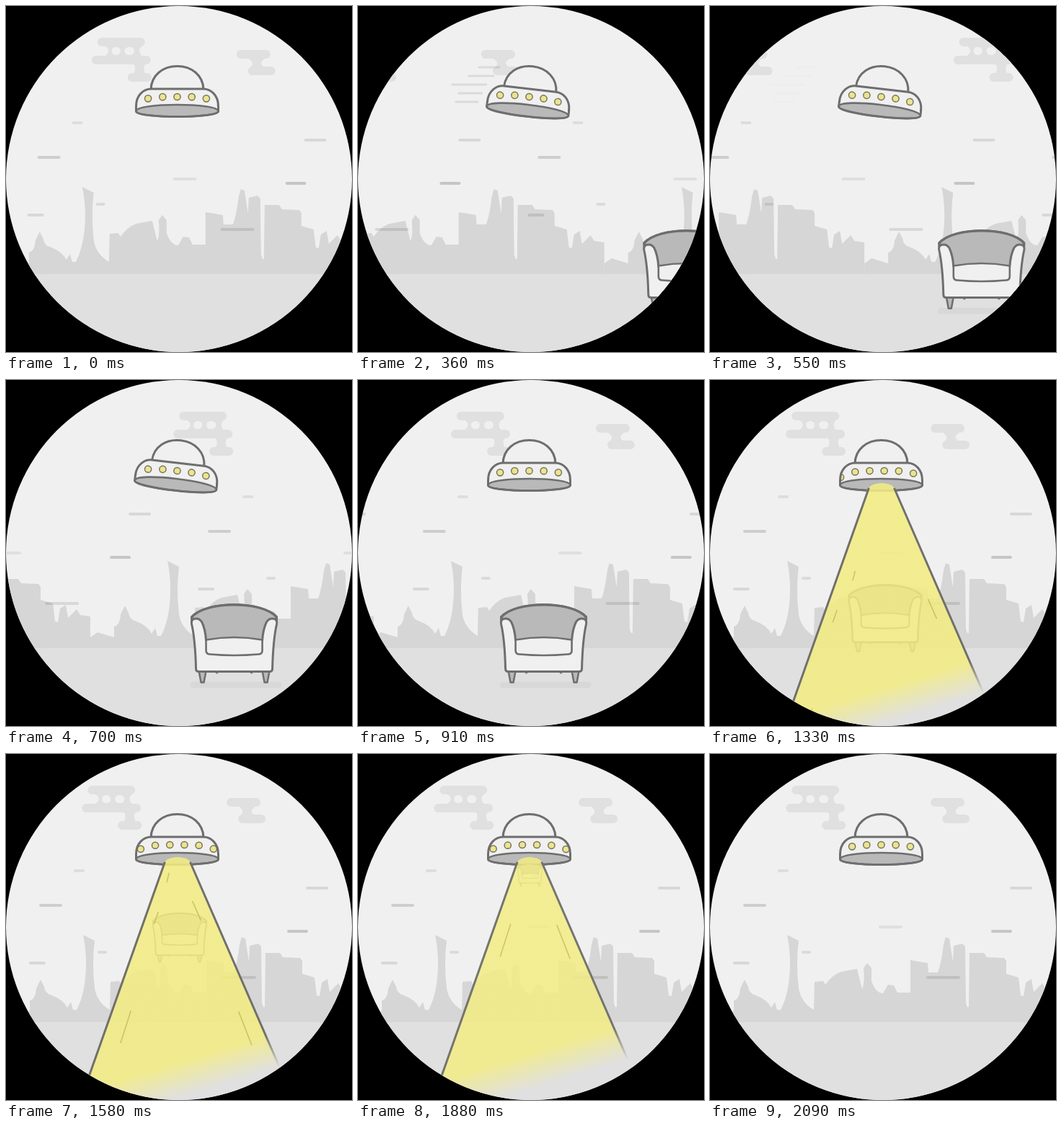
These frames come from a looping animation (480x480 px, 2.12 s). An HTML page with a canvas:

```html
<!DOCTYPE html>
<html lang="en">
<head>
<meta charset="utf-8">
<title>Flying saucer and armchair</title>
<style>
html, body { margin: 0; width: 100%; height: 100%; overflow: hidden; background: #000; }
canvas { display: block; }
</style>
</head>
<body>
<canvas id="stage" width="480" height="480"></canvas>
<script>
const c = document.getElementById('stage').getContext('2d');
const LOOP = 2120, LINE = '#6e6e6e', LIGHT = '#f0f0f0', GREY = '#b9b9b9';

const clamp = v => Math.min(1, Math.max(0, v));
const span = (t, a, b) => clamp((t - a) / (b - a));
const sine = p => (1 - Math.cos(Math.PI * p)) / 2;
const easeOut = p => 1 - (1 - p) ** 3;

// Skyline outline, one 480 px period.
const skyline = new Path2D('M0 373V357L10 350L33 357V342Q41 340 42 325L48 313L53 323Q54 332 62 334' +
  'Q80 341 85 352L90 344L93 355L98 355Q111 330 111 290Q111 270 107 251L123 259Q119 290 123 325' +
  'Q126 344 144 355L145 316L157 315L160 320Q170 306 182 302L204 298L211 326Q215 318 213 297' +
  'L218 290L224 297V315Q230 332 240 332L247 320L255 321L260 331H278V286L302 290L303 303H316' +
  'Q321 290 324 264L327 254L332 256L337 288L338 266L350 263L354 267L355 345L357 351H359L360 276' +
  'H380L384 282L408 283L411 287V305L428 310L431 335L435 336L438 317L446 312L449 330L461 318L466 326L480 328V373Z');

// x, y, length, opacity
const dashes = [[96, 162, 11, .08], [418, 186, 27, .1], [48, 210, 28, .14], [236, 240, 29, .07],
  [392, 246, 25, .18], [34, 290, 19, .1], [129, 275, 9, .09], [302, 310, 43, .1]];
const wake = [[168, 85, 28], [154, 97, 34], [131, 109, 47], [140, 121, 32], [136, 133, 30]];

function dash(x, y, len, alpha, width = 4) {
  c.strokeStyle = `rgba(0,0,0,${alpha})`;
  c.lineWidth = width;
  c.beginPath(); c.moveTo(x, y); c.lineTo(x + len, y); c.stroke();
}

function shape(d, fill, width = 3) {
  const path = new Path2D(d);
  if (fill) { c.fillStyle = fill; c.fill(path); }
  if (width) { c.strokeStyle = LINE; c.lineWidth = width; c.stroke(path); }
}

function pill(x, y, w, h = 12) {
  c.beginPath(); c.roundRect(x, y, w, h, h / 2); c.fill();
}

function at(x, y, draw) {
  c.save(); c.translate(x, y); draw(); c.restore();
}

function clouds() {
  c.fillStyle = '#e0e0e0';
  pill(0, 44, 66); pill(-8, 69, 82); pill(42, 93, 33);
  shape('M10 55H62Q55 62 62 70H10Q21 62 10 55ZM50 80H67Q62 87 67 94H50Q55 87 50 80Z', '#e0e0e0', 0);
  c.fillStyle = LIGHT;
  pill(20, 57, 12, 11); pill(38, 57, 13, 11);
  c.fillStyle = '#e0e0e0';
  pill(193, 61, 47); pill(209, 84, 38);
  shape('M208 72H234Q222 79 232 85H212Q220 79 208 72Z', '#e0e0e0', 0);
}

function scenery(t, shift) {
  c.fillStyle = LIGHT; c.fillRect(0, 0, 480, 480);
  for (const k of [0, 1]) at(128 - 1.085 * shift + 506 * k, 0, clouds);
  c.fillStyle = '#d6d6d6';
  for (const k of [0, 1]) at(480 * k - shift, 0, () => c.fill(skyline));
  c.fillStyle = '#e0e0e0'; c.fillRect(0, 372, 480, 108);

  const slide = 2 * shift % 480;
  for (const [x, y, len, alpha] of dashes)
    for (const k of [0, 1]) dash(x - slide + 480 * k, y, len, alpha);

  const strength = Math.sin(Math.PI * span(t, 150, 570));
  if (strength > 0.001)
    for (const [x, y, len] of wake) dash(x - (t - 360) * .25, y, len, .09 * strength, 3);
}

// The origin is the middle of the body.
function saucer(tilt, roll) {
  c.save();
  c.translate(237.5, 126);
  c.rotate(tilt);
  shape('M-36.5 -10C-36 -30 -20 -42.5 0 -42.5S36 -30 36.5 -10Z', LIGHT);
  const body = 'M-57 20V13C-57 -2 -47 -11 -36 -11H36C47 -11 57 -2 57 13V20C57 30 -57 30 -57 20Z';
  shape(body, LIGHT, 0);
  c.save();
  c.clip(new Path2D(body));
  c.fillStyle = '#ece48e'; c.strokeStyle = '#77745c'; c.lineWidth = 1.5;
  for (let i = -3; i <= 3; i++) {
    const x = i * 20.2 - roll % 20.2;
    c.beginPath(); c.arc(x, 7 * (x / 53) ** 4, 4.6, 0, 7); c.fill(); c.stroke();
  }
  c.restore();
  shape('M-57 20C-57 8 57 8 57 20C57 30 -57 30 -57 20Z', GREY, 2.6);
  shape(body, null);
  c.restore();
}

// The origin is the middle of the chair.
function chair(x, y, scale, shadow) {
  c.save();
  c.translate(x, y);
  if (shadow > 0) {
    c.fillStyle = `rgba(0,0,0,${.035 * shadow})`;
    pill(-61, 53, 127, 9);
  }
  c.scale(scale, scale);
  for (const side of [-1, 1]) {
    c.save();
    c.scale(side, 1);
    shape('M20 38L24 41L28 38', GREY, 2);
    shape('M39 38L42 54H46L49 38Z', GREY, 2.5);
    c.restore();
  }
  shape('M-59 -36C-40 -60 40 -60 59 -36L40 0H-40Z', GREY);
  shape('M-59 -36C-56 -30 -47 -34 -45 -27Q-40 -17 -39 -4H39Q40 -17 45 -27C47 -34 56 -30 59 -36' +
    'L52 38Q0 41 -52 38Z', LIGHT, 0);
  shape('M-38 -3Q-39 -20 -45 -30Q-50 -36 -56 -34Q-60 -33 -59 -26Q-54 -5 -53 36Q-53 39 -49 39' +
    'H49Q53 39 53 36Q54 -5 59 -26Q60 -33 56 -34Q50 -36 45 -30Q39 -20 38 -3', LIGHT, 0);
  shape('M-39 -4Q-40 -20 -45 -31Q0 -48 45 -31Q40 -20 39 -4Z', GREY, 0);
  shape('M-39 -4Q-40 -20 -45 -30Q-49 -36 -56 -34Q-60 -32 -59 -27Q-54 -5 -53 35Q-53 39 -49 39' +
    'H49Q53 39 53 35Q54 -5 59 -27Q60 -32 56 -34Q49 -36 45 -30Q40 -20 39 -4', null);
  shape('M-59 -32V-37C-40 -59 40 -59 59 -37V-32', null);
  shape('M-39 -5Q0 -12 39 -5V10Q39 15 33 15Q0 18 -33 15Q-39 15 -39 10Z', LIGHT, 2.6);
  c.restore();
}

// Light cone whose slanted, soft lower end sits at the given reach.
function beam(t, open) {
  if (open <= 0) return;
  const reach = 145 + 307 * open, half = 18 * open;
  const fade = (rgb, alpha) => {
    const g = c.createLinearGradient(240 - 7, reach - 23, 240 + 7, reach + 23);
    g.addColorStop(0, `rgba(${rgb},${alpha})`);
    g.addColorStop(1, `rgba(${rgb},0)`);
    return g;
  };
  const left = 238 - half, right = 238 + half;
  c.save();
  c.globalAlpha = Math.min(1, open);
  c.beginPath();
  c.moveTo(left - 118, 484);
  c.lineTo(left, 151);
  c.quadraticCurveTo(left + 2, 144, 238, 143);
  c.quadraticCurveTo(right - 2, 144, right, 151);
  c.lineTo(right + 145, 484);
  c.fillStyle = fade('243,236,130', .87);
  c.fill();

  c.lineWidth = 3;
  c.strokeStyle = fade('112,112,108', 1);
  c.beginPath();
  c.moveTo(left - 118, 484); c.lineTo(left, 151);
  c.moveTo(right, 151); c.lineTo(right + 145, 484);
  c.stroke();

  // Streaks rising along the rays: x at the upper end, y, slope, length
  c.lineWidth = 1.6;
  c.strokeStyle = fade('200,191,98', .9);
  c.beginPath();
  for (const [x, y, slope, len] of [[226, 166, -.25, 12], [211, 220, -.35, 16], [173, 357, -.32, 44],
    [259, 205, .44, 26], [323, 358, .39, 46]]) {
    const top = y - (t - 1580) * .4, end = top + len;
    if (top < 156) continue;
    c.moveTo(x + (top - y) * slope, top);
    c.lineTo(x + (end - y) * slope, end);
  }
  c.stroke();
  c.restore();
}

function draw(t) {
  const shift = 480 * sine(span(t, -34, 1061));
  const tilt = .115 * (sine(span(t, 0, 240)) - sine(span(t, 720, 890)));
  const lift = span(t, 1060, 2100);
  const rise = sine(lift);
  const open = easeOut(span(t, 1040, 1340)) - (1 - easeOut(1 - span(t, 1780, 2080)));

  c.clearRect(0, 0, 480, 480);
  c.save();
  c.beginPath(); c.arc(240, 240, 240, 0, 7); c.clip();
  c.lineCap = c.lineJoin = 'round';
  scenery(t, shift);
  saucer(tilt, 101 * rise);
  const scale = 1 - lift ** 1.43;
  if (scale > .005)
    chair(244 + .62 * (480 - shift) - 6 * rise, 365.5 - 221 * rise, scale, 1 - rise * 8);
  beam(t, open);
  c.restore();
}

const start = performance.now();
function tick() {
  draw((performance.now() - start) % LOOP);
  requestAnimationFrame(tick);
}
tick();
</script>
</body>
</html>
```
